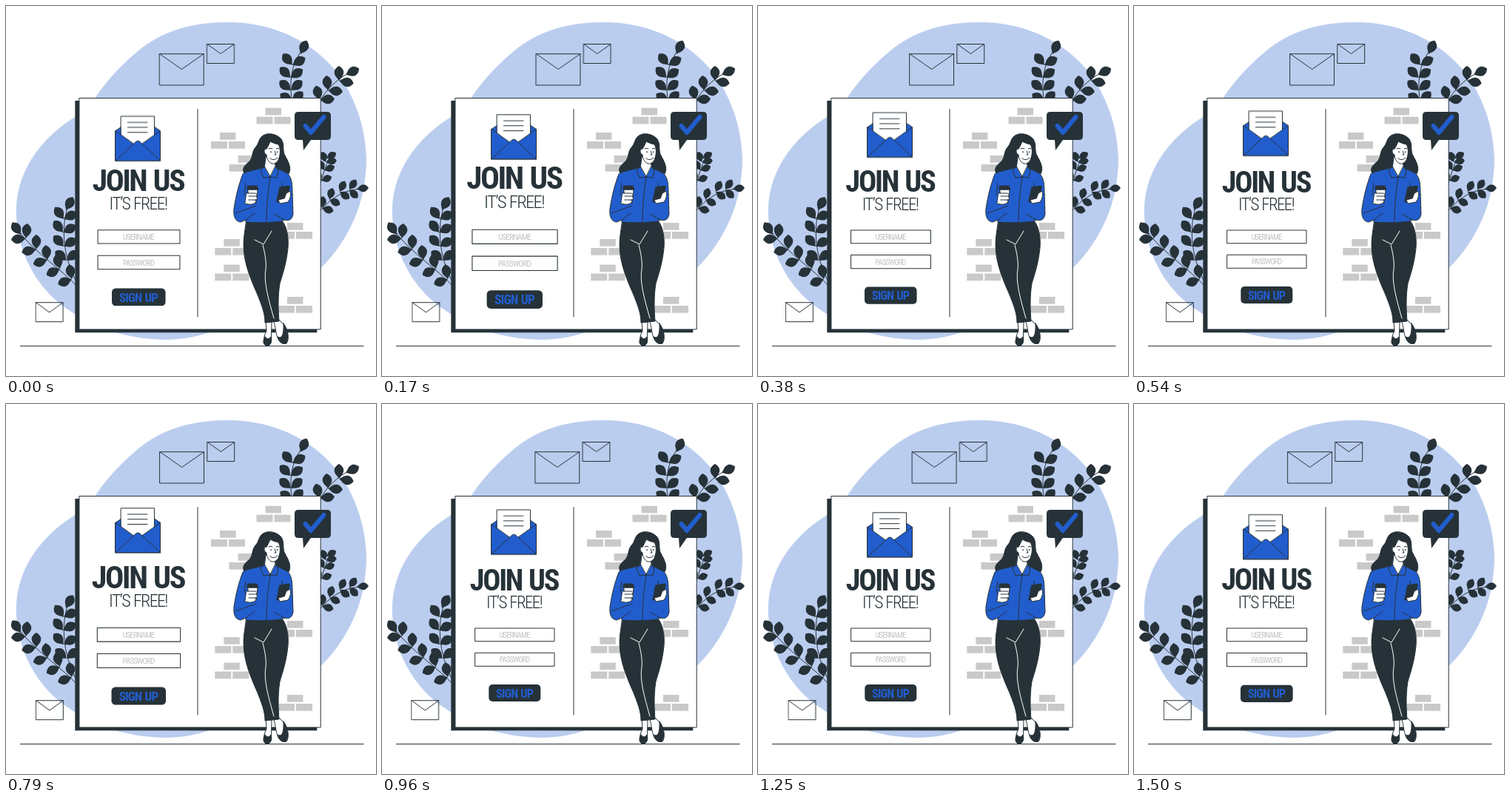
An HTML page without scripts for the animation above (1540 ms loop, 500 by 500 pixels).

```html
<!DOCTYPE html>
<html lang="en">
<head>
<meta charset="utf-8">
<title>Join us</title>
<style>
  html, body { margin: 0; width: 100%; height: 100%; overflow: hidden; background: #fff; }
  svg { display: block; width: 100vw; height: 100vh; }

  :root { --dark: #263238; --blue: #225dcd; --pale: #bbcdef; --grey: #c9c9c9; }
  .dark { fill: var(--dark); }
  .blue { fill: var(--blue); }
  .pale { fill: var(--pale); }
  .grey { fill: var(--grey); }
  .white { fill: #fff; }
  .line { stroke: var(--dark); stroke-width: 1; stroke-linecap: round; stroke-linejoin: round; }
  .none { fill: none; }
  .seam { fill: none; stroke: #fff; stroke-width: 1; stroke-linecap: round; }
  .tick { fill: none; stroke: var(--blue); stroke-width: 6; stroke-linecap: round; stroke-linejoin: round; }

  text {
    font-family: "Roboto Condensed", "Liberation Sans Narrow", Roboto, sans-serif;
    font-stretch: 75%;
    text-anchor: middle;
  }
  .title { font-size: 40px; font-weight: 700; letter-spacing: -2.2px; word-spacing: 2px; fill: var(--dark); }
  .sub { font-size: 23px; font-weight: 300; letter-spacing: -1.6px; word-spacing: 1px; fill: var(--dark); }
  .hint { font-size: 10.5px; letter-spacing: -.9px; fill: #c4c4c4; }
  .cta { font-size: 16.2px; font-weight: 700; letter-spacing: -.8px; word-spacing: 1px; fill: var(--blue); }

  .shake, .float, .beat { animation: shake 1.54s -55ms linear infinite; }
  .float { animation-name: float; }
  .beat { animation-name: beat; transform-origin: 179.5px 312px; }

  @keyframes shake {
    0%, 100% { transform: translateX(0); }
    10%, 90% { transform: translateX(-1px); }
    20%, 80% { transform: translateX(2px); }
    30%, 50%, 70% { transform: translateX(-4px); }
    40%, 60% { transform: translateX(4px); }
  }
  @keyframes float {
    50% { transform: translateY(-10px); }
  }
  @keyframes beat {
    0%, 30%, 40%, 60%, 100% { transform: scale(1); }
    10%, 50% { transform: scale(1.1); }
  }
</style>
</head>
<body>
<svg viewBox="0 0 500 500" xmlns="http://www.w3.org/2000/svg">
  <defs>
    <path id="leaf" d="M0 0C-2 -4 -6.5 -6 -6.300 -12C-6 -16 -2 -19 0 -20C2 -19 6 -16 6.300 -12C6.500 -6 2 -4 0 0Z"/>
    <g id="pair">
      <use href="#leaf" transform="rotate(-50)"/>
      <use href="#leaf" transform="rotate(50)"/>
    </g>
    <g id="bricks">
      <rect x="12" width="21.5" height="9.7"/>
      <rect y="12" width="22" height="9.7"/>
      <rect x="24" y="12" width="22" height="9.7"/>
    </g>
  </defs>

  <!-- Backdrop -->
  <path class="pale" d="M120 125C133 105 150 85 178 61C212 33 253 22 297 22C350 21 397 40 430 71C464 103 486 154 487 207C487 250 474 290 452 322C436 347 410 371 374 394C335 418 303 433 275 441C237 454 198 454 150 442C121 435 94 418 75 404C39 376 16 331 14 285C11 228 44 179 98 147Z"/>

  <!-- Plants -->
  <g class="dark">
    <g class="line none">
      <path d="M387 128C383 112 383 80 400 60"/>
      <path d="M420 136C432 112 448 98 468 88"/>
      <path d="M420 250C428 235 430 217 439 202"/>
      <path d="M422 280C438 260 455 248 482 247"/>
      <path d="M98 381C75 355 40 335 16 303"/>
      <path d="M98 378C84 355 70 310 84 270"/>
    </g>
    <use href="#leaf" transform="translate(398 65)rotate(25)"/>
    <use href="#pair" transform="translate(387 80)rotate(10)"/>
    <use href="#pair" transform="translate(384.5 97)rotate(5)"/>
    <use href="#pair" transform="translate(385 114)"/>
    <use href="#pair" transform="translate(387 130)rotate(-5)"/>

    <use href="#leaf" transform="translate(459 93)rotate(65)"/>
    <use href="#pair" transform="translate(450 101)rotate(50)"/>
    <use href="#pair" transform="translate(435 114)rotate(45)"/>
    <use href="#pair" transform="translate(424 127)rotate(35)"/>

    <use href="#leaf" transform="translate(433 206)rotate(60)scale(.75)"/>
    <use href="#pair" transform="translate(432 211)rotate(30)scale(.75)"/>
    <use href="#pair" transform="translate(430 222)rotate(20)scale(.75)"/>
    <use href="#pair" transform="translate(426 236)rotate(20)scale(.75)"/>

    <use href="#leaf" transform="translate(474 247)rotate(85)scale(.8)"/>
    <use href="#pair" transform="translate(464 248)rotate(85)scale(.8)"/>
    <use href="#pair" transform="translate(451 251)rotate(75)scale(.8)"/>
    <use href="#pair" transform="translate(437 261.5)rotate(65)scale(.8)"/>
    <use href="#pair" transform="translate(427 273)rotate(55)scale(.8)"/>

    <use href="#leaf" transform="translate(20 309)rotate(-35)"/>
    <use href="#pair" transform="translate(27 314)rotate(-45)"/>
    <use href="#pair" transform="translate(41 329)rotate(-50)"/>
    <use href="#pair" transform="translate(56 343)rotate(-57)"/>
    <use href="#pair" transform="translate(73 355)rotate(-65)"/>
    <use href="#pair" transform="translate(89 369)rotate(-60)"/>

    <use href="#leaf" transform="translate(81 276)rotate(28)"/>
    <use href="#pair" transform="translate(78 288)rotate(14)"/>
    <use href="#pair" transform="translate(77 306)rotate(12)"/>
    <use href="#pair" transform="translate(78 325)rotate(8)"/>
    <use href="#pair" transform="translate(82 344)"/>
  </g>

  <!-- Outlined mail -->
  <g class="shake line none">
    <path d="M208 64.700H267.500V107H208ZL237.700 85.500L267.500 64.700"/>
    <path d="M272.200 51.500H308.700V77.500H272.200ZL290.400 64.500L308.700 51.500"/>
    <path d="M40.700 400.700H77.300V426.700H40.700ZL59 414L77.300 400.700"/>
  </g>

  <!-- Card -->
  <path class="line none" d="M19.5 459.5H483"/>
  <rect class="dark" x="93.300" y="128" width="327" height="313.300"/>
  <rect class="white line" x="99.200" y="124.500" width="326" height="312.500"/>
  <path class="line none" d="M259 139.500V420"/>
  <g class="grey">
    <use href="#bricks" x="338.500" y="137.700"/>
    <use href="#bricks" x="277" y="171"/>
    <use href="#bricks" x="301.500" y="202"/>
    <use href="#bricks" x="368" y="293"/>
    <use href="#bricks" x="282.300" y="315"/>
    <use href="#bricks" x="282.300" y="349.500"/>
    <use href="#bricks" x="368" y="393"/>
  </g>

  <!-- Open envelope -->
  <g class="float line">
    <path class="blue" d="M148 169.300L156 164H200.500L208.500 169.300V209.700H148Z"/>
    <path class="white" d="M155.500 149.800H200.500V192H155.500Z"/>
    <path class="none" d="M164.500 158H191M164.500 164.700H191M164.500 171.500H191"/>
    <path class="blue" d="M148 169.300L178 191L208.500 169.300V209.700H148Z"/>
    <path class="blue" d="M148 209.700L174 185.500Q178 180.500 182.500 185.500L208.500 209.700Z"/>
  </g>

  <!-- Sign-up form -->
  <g class="beat">
    <text class="title" x="178.500" y="252">JOIN US</text>
    <text class="sub" x="178.500" y="276">IT’S FREE!</text>
    <rect class="white line" x="126" y="303" width="107" height="17.700"/>
    <text class="hint" x="179" y="316">USERNAME</text>
    <rect class="white line" x="126" y="336.300" width="107" height="18"/>
    <text class="hint" x="179" y="349.300">PASSWORD</text>
    <rect class="dark" x="144.300" y="379" width="70" height="23" rx="5"/>
    <text class="cta" x="179" y="396.500">SIGN UP</text>
  </g>

  <!-- Speech bubble -->
  <path class="dark" d="M395 143H434Q439 143 439 148V176Q439 181 434 181H412L402 195L401 181H395Q390 181 390 176V148Q390 143 395 143Z"/>
  <path class="tick" d="M404.500 162L412 171L429.500 150"/>

  <!-- Woman -->
  <g class="line">
    <path class="dark" d="M353 173C341 175 343 184 338 190C331 197 335 204 328 211C321 216 319 221 322 226L382 227C387 218 380 208 377 202C373 196 377 187 372 180C367 174 359 172 353 173Z"/>
    <path class="white" d="M351 204L349 221L357 232L365 221L363 210Z"/>
    <path class="white" d="M352 193C348 192 348 199 352 201C352 206 355 211 359 213C364 214 368 210 369 205C371 199 371 192 368 187C364 186 360 185 357 183C355 188 354 190 352 193Z"/>
    <path class="none" d="M355 193Q357 191 360 193M365 193Q367 191 369 193M363 196L365 201H363M357 206Q362 210 367 205"/>
    <path class="none" stroke-width="1.6" d="M358 197V197.500M366.500 197V197.500"/>

    <path class="white" d="M351 424L352 439C348 447 347 455 351 458.500C356 460 359 455 358.500 447L359 428Z"/>
    <path class="dark" d="M350 447C346 453 348 459 353 459C358 459 360 453 358 447Q354 453 350 447Z"/>
    <path class="white" d="M361 424C365 435 364 441 367 448C370 455 375 458 378 455C381 449 379 438 375 430L369 424Z"/>
    <path class="dark" d="M375 429C382 438 383 451 379 456C374 458 368 454 367 447Q376 452 375 429Z"/>

    <path class="dark" d="M325 290H373C381 300 383 318 380 335C378 350 374 362 370 375C367 394 368 412 369 426L350 428C350 415 345 403 339 388C327 361 318 337 322 309Z"/>
    <path class="seam" d="M336 316L348 322L359 304M347 323C350 335 352 345 351 356C348 372 354 394 362 422"/>

    <path class="blue" d="M346 219C335 222 325 223 320 227C314 243 311 255 308 274C307 285 310 291 317 292L324 289V292Q350 294 372 291L376 289C383 291 387 288 388 281L387 250C387 238 385 230 380 226C374 223 370 221 365 219L357 232Z"/>
    <path class="blue" d="M349 217L344 222L348 232L357 231ZM364 217L368 222L366 232L357 231Z"/>
    <path class="none" d="M357 232C354 250 352 270 352 291M324 240L322 255M310 280L338 270M324 289L336 280M373 239L374 247M376 289L362 281"/>

    <path class="white" d="M327 248H340L338 266H329Z"/>
    <path class="dark" d="M327 243H339L341 248H326Z"/>
    <path class="white" d="M325 253L337 253Q341 255 338 257L339 258Q341 261 337 262L338 265Q333 270 323 267Z"/>
    <path class="none" d="M328 257H338M328 262H337"/>

    <path class="dark" d="M370 245L382 243Q384 243 383 246L378 263L366 265Z"/>
    <path class="white" d="M379 253L384 250Q386 258 381 265L370 267L368 262L376 260Z"/>
  </g>
</svg>
</body>
</html>
```
